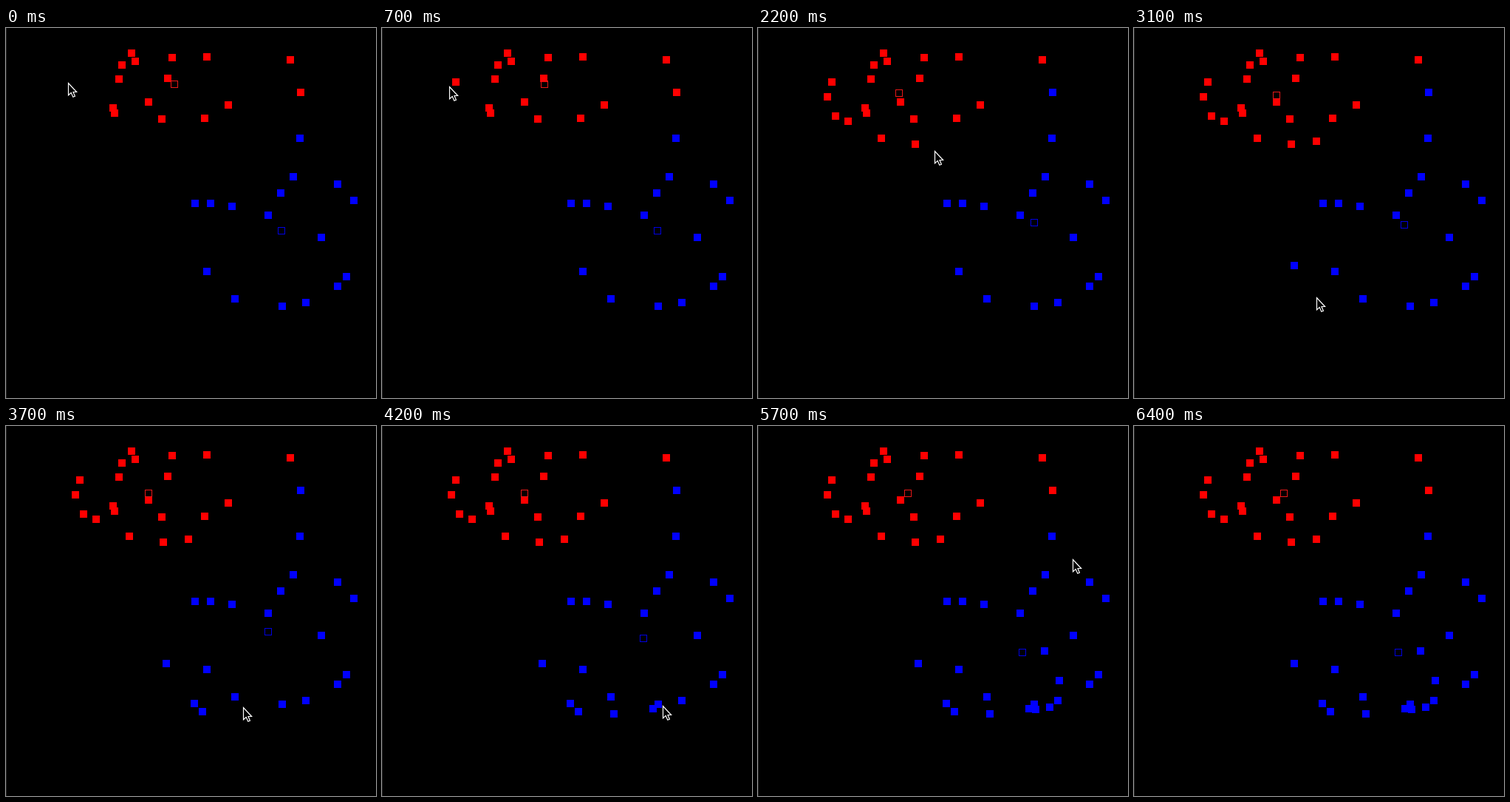
Animation of 501 by 500 pixels, one loop 6.8 s. Source, as an HTML page with a canvas:

```html
<!DOCTYPE html>
<html>
<head>
<meta charset="utf-8">
<style>
html, body { margin: 0; width: 100%; height: 100%; overflow: hidden; background: #000; }
canvas { display: block; }
</style>
</head>
<body>
<canvas id="stage" width="501" height="500"></canvas>
<script>
const ctx = document.getElementById('stage').getContext('2d');
const LOOP = 6800, TICK = 100, HIDE = 6400;
const COLORS = [['#f00', '#e81818'], ['#00f', '#0000e0']];

const START = [
  [170,34], [157,50], [175,45], [153,69], [145,108], [147,115], [225,40], [219,68],
  [193,100], [211,123], [272,39], [301,104], [269,122], [385,43], [399,87],
  [398,149], [389,201], [372,223], [449,211], [471,233], [256,237], [277,237], [306,241],
  [355,253], [427,283], [272,329], [310,366], [374,376], [406,371], [449,349], [461,336]
];

// Points added by clicking, at an even pace
const CLICKS = [
  [100,73], [94,93], [105,119], [122,126], [167,149], [213,157], [247,153], [217,321],
  [255,375], [266,386], [314,389], [367,382], [376,383], [395,380], [408,344], [388,304]
];
const clickTime = i => 600 + 313 * i;

// The pointer is at each new point shortly before it shows, with a few stops between
const STOPS = [
  [200,84,74], [1300,120,120], [2200,239,166], [2500,212,313], [3100,247,364],
  [4200,380,378], [5000,401,326], [5700,426,180], [5800,426,180], [6300,78,8]
];
const PATH = CLICKS.map(([x, y], i) => [clickTime(i) - 100, x - 5, y - 7])
  .concat(STOPS)
  .sort((a, b) => a[0] - b[0]);

const dist2 = (a, b) => (a[0] - b[0]) ** 2 + (a[1] - b[1]) ** 2;
const mean = (pts, i) => Math.floor(pts.reduce((sum, p) => sum + p[i], 0) / pts.length);

// Two-means clustering, carried on from the previous centres after each click
function cluster(t) {
  const points = [...START];
  let centers = [[228, 76], [373, 274]], groups;
  const settle = () => {
    for (let n = 0; n < 4; n++) {
      groups = [[], []];
      for (const p of points)
        groups[dist2(p, centers[0]) < dist2(p, centers[1]) ? 0 : 1].push(p);
      centers = groups.map(g => [mean(g, 0), mean(g, 1)]);
    }
  };
  settle();
  CLICKS.filter((_, i) => clickTime(i) <= t).forEach(p => {
    points.push(p);
    settle();
  });
  return { centers, groups };
}

function pointerAt(t) {
  const i = PATH.findIndex(k => k[0] >= t);
  if (i < 1) return PATH[0].slice(1);
  const [a, b] = [PATH[i - 1], PATH[i]];
  const f = (t - a[0]) / (b[0] - a[0]);
  return [1, 2].map(j => Math.round(a[j] + (b[j] - a[j]) * f));
}

const ARROW = new Path2D('M.5.5V16.8L4.2 13.4 6.8 19.3 9.4 18.2 7 12.5H11.6Z');

function drawPointer([x, y]) {
  ctx.save();
  ctx.translate(x, y);
  ctx.fillStyle = '#000';
  ctx.strokeStyle = '#fff';
  ctx.lineWidth = 1.2;
  ctx.fill(ARROW);
  ctx.stroke(ARROW);
  ctx.restore();
}

function draw(now) {
  const t = Math.floor(now % LOOP / TICK) * TICK;
  ctx.fillStyle = '#000';
  ctx.fillRect(0, 0, 501, 500);
  ctx.fillStyle = '#222';
  ctx.fillRect(0, 0, 1, 500);

  const { centers, groups } = cluster(t);
  ctx.lineWidth = 1;
  groups.forEach((group, i) => {
    const [x, y] = centers[i];
    [ctx.fillStyle, ctx.strokeStyle] = COLORS[i];
    for (const p of group) ctx.fillRect(p[0] - 5, p[1] - 5, 10, 10);
    ctx.strokeRect(x - 4.5, y - 4.5, 9, 9);
  });
  if (t < HIDE) drawPointer(pointerAt(t));
}

const begin = performance.now();
function loop() {
  draw(performance.now() - begin);
  requestAnimationFrame(loop);
}
loop();
</script>
</body>
</html>
```
